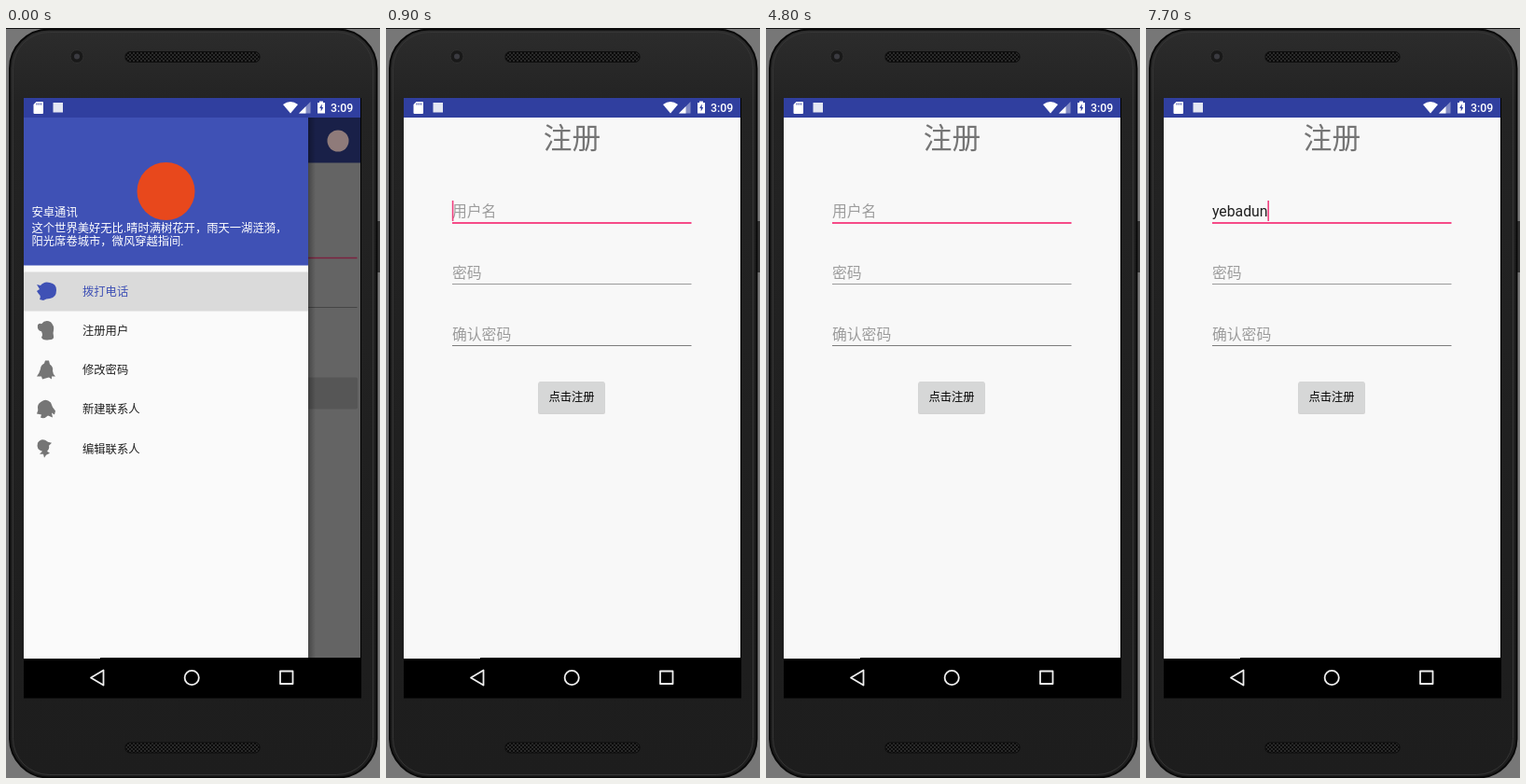
Animation of 401x804 px, one loop 8 s. Source, as an HTML page:

```html
<!DOCTYPE html>
<html lang="zh-CN">
<head>
<meta charset="utf-8">
<style>
html, body { margin: 0; width: 100%; height: 100%; overflow: hidden; background: #777; }
svg { display: block; width: 401px; height: 804px; }
text { font: 12.3px Roboto, "Noto Sans CJK SC", "Noto Sans CJK", sans-serif; white-space: pre; }
.title { font-size: 30.7px; fill: #757575; }
.field { font-size: 15.8px; }
.hint { fill: #9c9c9c; }
.mid { text-anchor: middle; }
.time { font-weight: 500; }
.item { color: #757575; fill: #212121; }
.item .row { fill: none; }
.item path { fill: currentColor; }
.item.on { color: #3f51b5; fill: #3f51b5; }
.item.on .row { fill: #dadada; }
</style>
</head>
<body>
<svg viewBox="0 0 401 804">
  <defs>
    <linearGradient id="body" x2="0" y2="1">
      <stop offset="0" stop-color="#2c2c2c"/><stop offset=".1" stop-color="#232323"/>
      <stop offset="1" stop-color="#1d1d1d"/>
    </linearGradient>
    <linearGradient id="shade">
      <stop offset="0" stop-opacity=".3"/><stop offset="1" stop-opacity="0"/>
    </linearGradient>
    <pattern id="mesh" width="4" height="4" patternUnits="userSpaceOnUse">
      <rect width="4" height="4" fill="#292929"/>
      <path d="M0 0h2v2h-2zM2 2h2v2h-2z" fill="#0b0b0b"/>
    </pattern>
  </defs>

  <!-- phone -->
  <rect width="401" height="804" fill="#777"/>
  <path d="M0 .5H401" stroke="#111"/>
  <rect x="398" y="207" width="3" height="55" fill="#333"/>
  <rect x="4" y="1.5" width="393.5" height="802" rx="42" fill="url(#body)" stroke="#090909" stroke-width="2"/>
  <rect x="7.5" y="4.5" width="386" height="796" rx="39" fill="none" stroke="#363636"/>
  <circle cx="76" cy="30.500" r="7" fill="#191919" stroke="#303030"/>
  <circle cx="76" cy="30.500" r="3" fill="#3a3a40"/>
  <g fill="url(#mesh)" stroke="#0c0c0c">
    <rect x="128" y="25.500" width="144" height="11" rx="5"/>
    <rect x="128" y="766" width="144" height="11" rx="5"/>
  </g>
  <rect x="19" y="75" width="362" height="643.500"/>
  <rect x="19" y="75" width="361" height="21" fill="#303f9f"/>

  <!-- drawer over the dimmed page -->
  <g id="drawer">
    <rect x="323" y="96" width="57" height="579" fill="#646464"/>
    <rect x="323" y="96" width="57" height="48.500" fill="#192048"/>
    <circle cx="356" cy="121" r="11.500" fill="#8f7b7a"/>
    <path d="M323 246.500H376.500" stroke="#7c2340" stroke-width="1.500"/>
    <path d="M323 299.500H376.500" stroke="#454545"/>
    <rect x="318" y="374.500" width="59" height="34" rx="2" fill="#565656"/>
    <rect x="324" y="96" width="8" height="579" fill="url(#shade)"/>
    <path d="M19 96H324V675H101V676H19z" fill="#fafafa"/>
    <rect x="19" y="96" width="305" height="158.500" fill="#3f51b5"/>
    <circle cx="171.500" cy="175" r="31" fill="#e8481c"/>
    <g fill="#fff">
      <text x="27.500" y="201.700">安卓通讯</text>
      <text x="27.500" y="218.800">这个世界美好无比.晴时满树花开，雨天一湖涟漪，</text>
      <text x="27.500" y="233.200">阳光席卷城市，微风穿越指间.</text>
    </g>
    <g id="menu"></g>
  </g>

  <!-- sign-up page -->
  <g id="page">
    <rect x="19" y="75" width="361" height="21" fill="#303f9f"/>
    <path d="M19 96H380V675H101V676H19z" fill="#f8f8f8"/>
    <text class="title mid" x="199.500" y="128.500">注册</text>
    <text class="field hint" id="hint" x="71" y="202">用户名</text>
    <text class="field hint" x="71" y="268">密码</text>
    <text class="field hint" x="71" y="334">确认密码</text>
    <text class="field" id="typed" x="71" y="202" fill="#212121"></text>
    <rect id="caret" y="185" width="1.600" height="22" fill="#f0407f"/>
    <rect x="71" y="208" width="256.500" height="2" fill="#f64b88"/>
    <path d="M71 274.500H327.500" stroke="#9a9a9a"/>
    <path d="M71 340.500H327.500" stroke="#7d7d7d"/>
    <rect x="163" y="380" width="72" height="34" rx="2" fill="#000" opacity=".15"/>
    <rect x="163.500" y="379" width="71" height="33.500" rx="2" fill="#d6d7d7"/>
    <text class="mid" x="199" y="400" font-weight="500">点击注册</text>
  </g>

  <!-- system bars -->
  <g fill="#fff">
    <path d="M32.500 79H39Q40 79 40 80V91Q40 92 39 92H30.500Q29.500 92 29.500 91V82z"/>
    <path d="M33 80.500v2M35.200 80.500v2M37.400 80.500v2" stroke="#303f9f"/>
    <rect x="50.500" y="80" width="10.500" height="10.500" fill="#e3e6f2"/>
    <path d="M297 82Q305 76 313 82L305 91.500z"/>
    <path d="M326.500 79V91.500H314z" opacity=".4"/>
    <path d="M321.500 84V91.500H314z"/>
    <path d="M336 78.500h4v1.500h2v11.500h-8v-11.500h2z"/>
    <path d="M338.700 81.500l-2.500 4.500h1.500v3.500l2.500-4.500h-1.500z" fill="#303f9f"/>
    <text class="time" x="348" y="90">3:09</text>
  </g>
  <g fill="none" stroke="#eee" stroke-width="1.800" stroke-linejoin="round">
    <path d="M104.500 688.500V704.500L91 696.500z"/>
    <circle cx="199.200" cy="696.500" r="7.600"/>
    <rect x="294" y="689.500" width="13.500" height="13.500"/>
  </g>
</svg>
<script>
const $ = id => document.getElementById(id);
const LOOP = 8000, USER = "yebadun";
const KEYS = [5500, 5600, 5700, 6800, 7000, 7500, 7700];
const BLINKS = [1100, 1600, 2000, 2500, 3000, 3400, 3900, 4300, 4800, 5300, 6200, 6600];

const items = [
  ["拨打电话", "M-10-7L-6-6Q-2-11 4-9Q11-8 11-1Q11 7 4 8Q0 8-3 10L-7 9Q-5 5-8 3L-10 0L-7-2z"],
  ["注册用户", "M-9-6Q-7-8-5-7Q-1-12 5-9Q9-5 8 0Q7 3 8 6Q9 10 3 10Q-4 11-5 7Q-3 5-5 1Q-10 0-9-6z"],
  ["修改密码", "M-1-10L3-10L4-6Q8-3 7 1Q7 4 10 7L6 7L6 10L3 8L-4 10L-5 7L-10 7Q-7 3-6-1Q-6-5-2-7z"],
  ["新建联系人", "M-5-8Q0-12 5-7L7-2L10 2L9 6L6 4L7 9L2 7Q-2 11-6 9L-5 6L-10 5Q-8 1-9-2Q-9-6-5-8z"],
  ["编辑联系人", "M-9-6Q-6-11-1-9L2-7L6-6L3-3Q4 0 1 3L4 5L0 7L-2 10L-3 6L-7 6L-4 3Q-11 1-9-6z"]
];
$("menu").innerHTML = items.map(([label, shape], i) => `
  <g class="item" transform="translate(0 ${i * 42.2})">
    <rect class="row" x="19" y="261.500" width="305" height="42"/>
    <path transform="translate(43 282)" d="${shape}"/>
    <text x="82" y="286.800">${label}</text>
  </g>`).join("");

const passed = (times, t) => times.filter(x => x <= t).length;

function draw(t) {
  const chosen = t < 500 ? 0 : 1;
  [...$("menu").children].forEach((el, i) => el.classList.toggle("on", i === chosen));

  const entering = t < 800 ? [7, .97] : t < 900 ? [2, .995] : [0, 1];
  $("page").style.display = t < 700 ? "none" : "";
  $("page").setAttribute("transform", `translate(0 ${entering[0]})`);
  $("page").setAttribute("opacity", entering[1]);

  const typed = USER.slice(0, passed(KEYS, t));
  $("typed").textContent = typed;
  $("hint").style.display = typed ? "none" : "";
  const width = typed && t >= 700 ? $("typed").getComputedTextLength() : 0;
  $("caret").setAttribute("x", 70.8 + width);
  $("caret").style.display = passed(BLINKS, t) % 2 ? "none" : "";
}

const start = performance.now();
function tick() {
  draw((performance.now() - start) % LOOP);
  requestAnimationFrame(tick);
}
tick();
</script>
</body>
</html>
```
